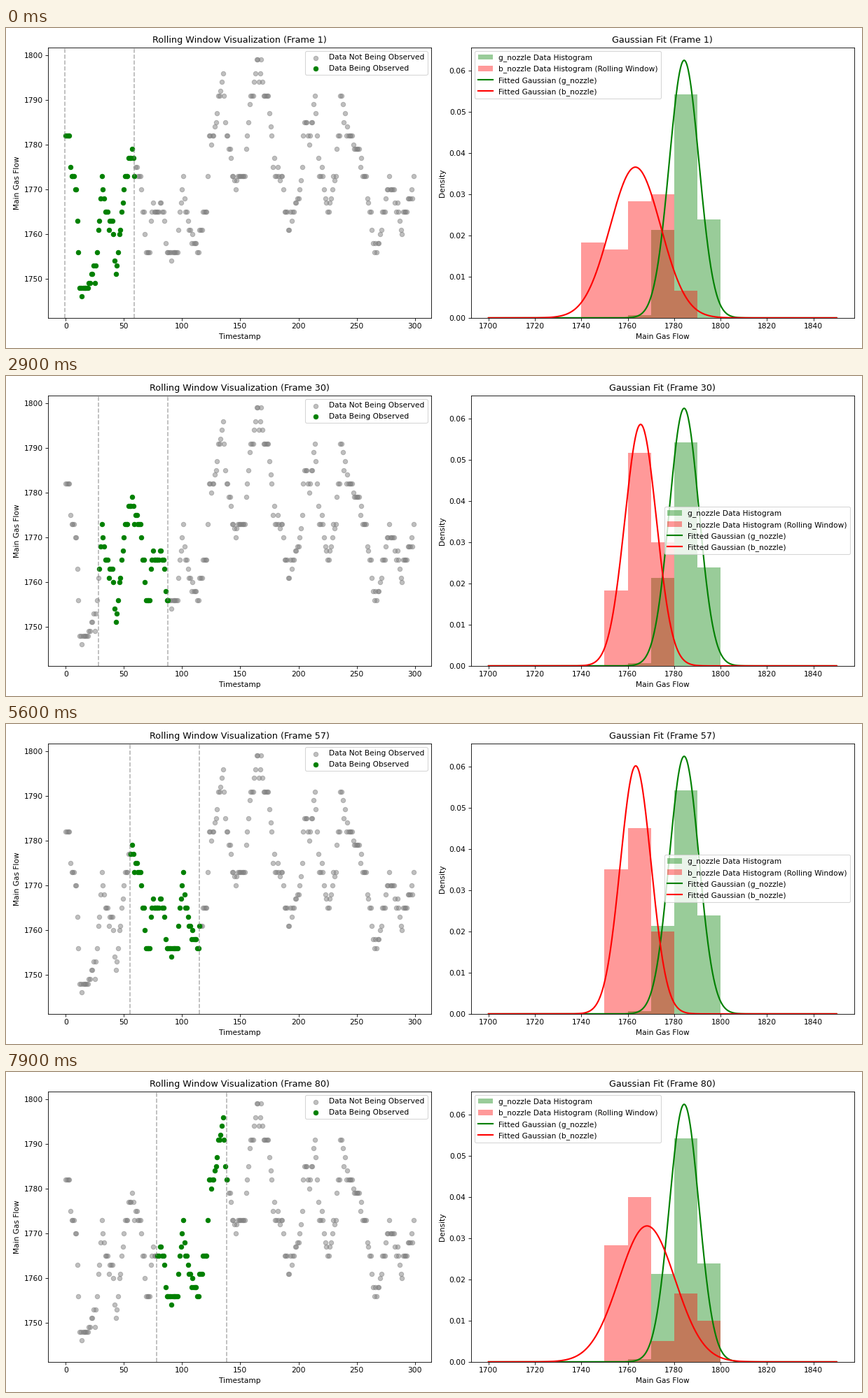
A matplotlib script that plays this animation: 1222x458 px, repeating every 8 s.

```python
import matplotlib.pyplot as plt
import numpy as np
from matplotlib.animation import FuncAnimation

FRAMES, WINDOW, COUNT = 80, 60, 300
LOW, STEP, TOP_STEP = 1744.05, 1.727, 32
DPI = 1222 / 16

# Turning points of the gas flow: timestamp -> reading.
TURNS = {0: 1783, 9: 1770, 12: 1746, 26: 1752, 31: 1773, 35: 1763, 40: 1763,
         43: 1751, 51: 1773, 56: 1778, 64: 1772, 70: 1755, 76: 1767, 84: 1765,
         87: 1756, 95: 1755, 101: 1773, 103: 1763, 112: 1757, 121: 1766,
         123: 1781, 127: 1781, 135: 1796, 138: 1783, 145: 1771, 154: 1774,
         158: 1789, 165: 1798, 174: 1789, 178: 1777, 185: 1774, 191: 1761,
         202: 1770, 205: 1788, 209: 1781, 214: 1790, 217: 1777, 226: 1765,
         232: 1774, 237: 1791, 242: 1783, 256: 1774, 266: 1755, 278: 1772,
         289: 1761, 299: 1772}


def make_flow(t):
    """Trend with jitter, read by a sensor that tends to stick at every fifth step."""
    rng = np.random.default_rng(4)
    trend = np.interp(t, list(TURNS), list(TURNS.values()))
    steps = (trend - LOW) / STEP + rng.normal(0, 0.5, len(t))
    drift = (steps + 0.5) % 5 - 2.5
    stuck = rng.random(len(t)) > np.abs(drift) / 2
    steps = np.round(np.where(stuck, steps - drift, steps))
    return np.round(LOW + STEP * np.clip(steps, 0, TOP_STEP))


def gauss(x, mean, sd):
    return np.exp(-((x - mean) / sd) ** 2 / 2) / (sd * np.sqrt(2 * np.pi))


time = np.arange(COUNT)
flow = make_flow(time)
points = np.column_stack([time, flow])
edges = np.arange(1700, 1851, 10)
xs = np.linspace(1700, 1850, 1000)
good_curve = gauss(xs, 1784.3, 6.385)
good_bars = np.zeros(len(edges) - 1)
good_bars[6:10] = 0.0006, 0.0214, 0.0542, 0.0238

fig, (ax_flow, ax_fit) = plt.subplots(1, 2, figsize=(1222 / DPI, 458 / DPI), dpi=DPI)

unseen = ax_flow.scatter(time, flow, color="gray", alpha=0.5,
                         label="Data Not Being Observed")
seen = ax_flow.scatter(time, flow, color="green", label="Data Being Observed")
ax_flow.set(xlabel="Timestamp", ylabel="Main Gas Flow",
            xlim=ax_flow.get_xlim(), ylim=(1741.25, 1801.75))
bounds = [ax_flow.axvline(0, color="gray", linestyle="--", alpha=0.6)
          for _ in range(2)]
ax_flow.legend(loc="upper right")


def add_bars(color, label):
    return ax_fit.bar(edges[:-1], good_bars, width=10, align="edge",
                      color=color, alpha=0.4, label=label)


def add_curve(color, name):
    return ax_fit.plot(xs, good_curve, color=color, lw=2,
                       label=f"Fitted Gaussian ({name})")[0]


good_hist = add_bars("green", "g_nozzle Data Histogram")
bad_hist = add_bars("red", "b_nozzle Data Histogram (Rolling Window)")
good_line = add_curve("green", "g_nozzle")
bad_line = add_curve("red", "b_nozzle")
ax_fit.set(xlabel="Main Gas Flow", ylabel="Density", xlim=ax_fit.get_xlim())
ax_fit.legend(handles=[good_hist, bad_hist, good_line, bad_line], loc="best")


def update(i):
    inside = (time >= i) & (time < i + WINDOW)
    seen.set_offsets(points[inside])
    unseen.set_offsets(points[~inside])
    for line, x in zip(bounds, (i - 1, i + WINDOW - 1)):
        line.set_xdata([x, x])

    sample = flow[inside]
    density, _ = np.histogram(sample, bins=edges, density=True)
    for bar, height in zip(bad_hist, density):
        bar.set_height(height)
    curve = gauss(xs, sample.mean(), sample.std())
    bad_line.set_ydata(curve)
    ax_fit.set_ylim(0, 1.05 * max(curve.max(), good_curve.max(), density.max()))

    ax_flow.set_title(f"Rolling Window Visualization (Frame {i + 1})")
    ax_fit.set_title(f"Gaussian Fit (Frame {i + 1})")
    return []


update(0)
fig.tight_layout()
anim = FuncAnimation(fig, update, frames=FRAMES, interval=100, repeat=True,
                     repeat_delay=0, init_func=lambda: update(0))
plt.show()
```
